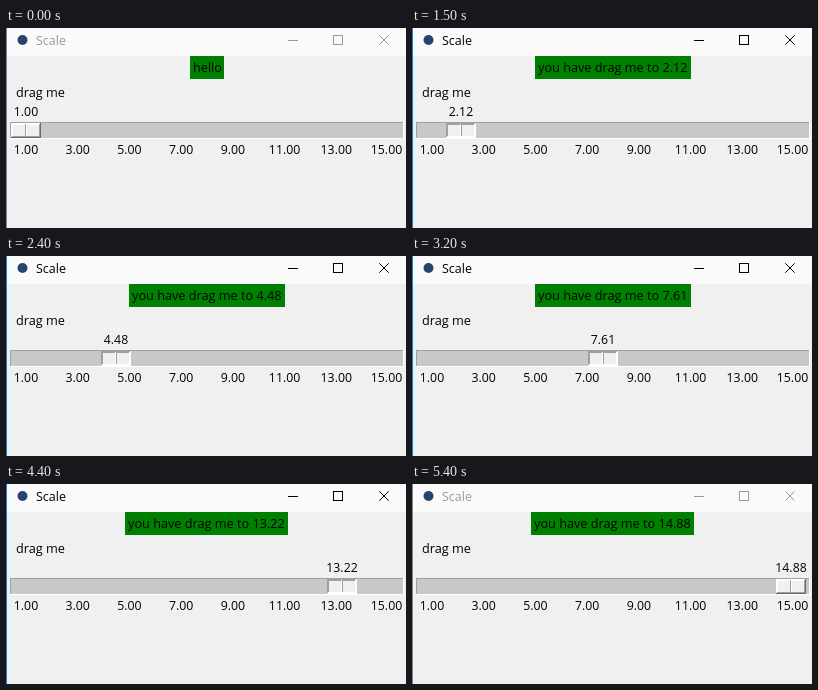
An HTML page for the animation above (5.5 s loop, 400x200 px).

```html
<!DOCTYPE html>
<html lang="en">
<head>
<meta charset="utf-8">
<title>Scale</title>
<style>
  html, body { margin: 0; width: 100%; height: 100%; overflow: hidden; background: #f0f0f0; }
  svg { display: block; width: 400px; height: 200px; }
  text { font: 12.7px "Open Sans", "Noto Sans", sans-serif; fill: #000; white-space: pre; }
  .num { font-size: 12.3px; text-anchor: middle; }
  #title { font-size: 12.5px; }
  #buttons { fill: none; stroke: #000; }
  .idle #title { fill: #999; }
  .idle #buttons { stroke: #999; }
  #edge { fill: #1a80d0; }
  .idle #edge { fill: #6f8f93; }
</style>
</head>
<body>
<svg id="win" viewBox="0 0 400 200" shape-rendering="crispEdges">
  <rect width="400" height="200" fill="#f0f0f0"/>
  <rect width="400" height="28" fill="#fafafa"/>
  <rect id="edge" width="1" height="200"/>
  <circle cx="16.5" cy="12" r="5" fill="#26456e" shape-rendering="auto"/>
  <text id="title" x="30" y="17">Scale</text>
  <g id="buttons">
    <path d="M282 12.5h10M327.5 7.5h9v9h-9z"/>
    <path d="M373.3 7.3l9.4 9.4M382.7 7.3l-9.4 9.4" shape-rendering="auto"/>
  </g>
  <rect id="box" y="28" height="23" fill="#008000"/>
  <text id="label" y="44"></text>
  <text x="10" y="69">drag me</text>
  <text id="value" class="num" y="88"></text>
  <g id="trough"></g>
  <g id="raised"></g>
  <g id="sunken"></g>
  <g id="ticks"></g>
</svg>
<script>
const LOOP = 5500, STEP = 100, TRAVEL = 362;
const PRESS = 900, RELEASE = 5100, BLUR = 5400;

// [time in ms, slider offset in px]
const path = [
  [900, 0], [1400, 24], [1500, 29], [2000, 58], [2400, 90], [2600, 103],
  [3200, 171], [3700, 232], [3800, 245], [4400, 316], [4700, 344],
  [5000, 358], [5100, 359]
];

const $ = id => document.getElementById(id);
const toValue = px => (1 + px * 14 / TRAVEL).toFixed(2);

function bevel(x, y, w, h, fill, topLeft, bottomRight) {
  const rect = (x, y, w, h, c) =>
    `<rect x="${x}" y="${y}" width="${w}" height="${h}" fill="${c}"/>`;
  return rect(x, y, w, h, bottomRight) +
    rect(x, y, w - 1, h - 1, topLeft) +
    rect(x + 1, y + 1, w - 2, h - 2, fill);
}

function slider(outer, inner) {
  return bevel(5, 95, 30, 15, '#f0f0f0', ...outer) +
    bevel(6, 96, 14, 13, '#f0f0f0', ...inner) +
    bevel(20, 96, 14, 13, '#f0f0f0', ...inner);
}

$('trough').innerHTML = bevel(4, 94, 394, 17, '#c8c8c8', '#a0a0a0', '#fff');
$('raised').innerHTML = slider(['#fff', '#696969'], ['#fff', '#a0a0a0']);
$('sunken').innerHTML = slider(['#a0a0a0', '#fff'], ['#a0a0a0', '#fff']);

for (let v = 1; v <= 15; v += 2) {
  const x = Math.min(20 + (v - 1) * TRAVEL / 14, 380.5);
  $('ticks').innerHTML += `<text class="num" x="${x}" y="126">${v.toFixed(2)}</text>`;
}

function offsetAt(t) {
  if (t <= path[0][0]) return 0;
  const i = path.findIndex(p => p[0] >= t);
  if (i < 0) return path[path.length - 1][1];
  const [t0, a] = path[i - 1], [t1, b] = path[i];
  return Math.round(a + (b - a) * (t - t0) / (t1 - t0));
}

function draw(now) {
  const t = Math.floor(now % LOOP / STEP) * STEP;
  const px = offsetAt(t), value = toValue(px);
  const [left, width] = px === 0 ? [184, 34] : value >= 10 ? [119, 163] : [123, 156];
  const held = t >= PRESS && t < RELEASE;

  $('win').classList.toggle('idle', t < PRESS || t >= BLUR);
  $('box').setAttribute('x', left);
  $('box').setAttribute('width', width);
  $('label').setAttribute('x', left + 3);
  $('label').textContent = px === 0 ? 'hello' : `you have drag me to ${value}`;
  $('value').setAttribute('x', 20 + px);
  $('value').textContent = value;
  for (const id of ['raised', 'sunken']) {
    $(id).setAttribute('transform', `translate(${px} 0)`);
    $(id).style.display = (id === 'sunken') === held ? '' : 'none';
  }
}

const start = performance.now();
function tick() {
  draw(performance.now() - start);
  requestAnimationFrame(tick);
}
tick();
</script>
</body>
</html>
```
